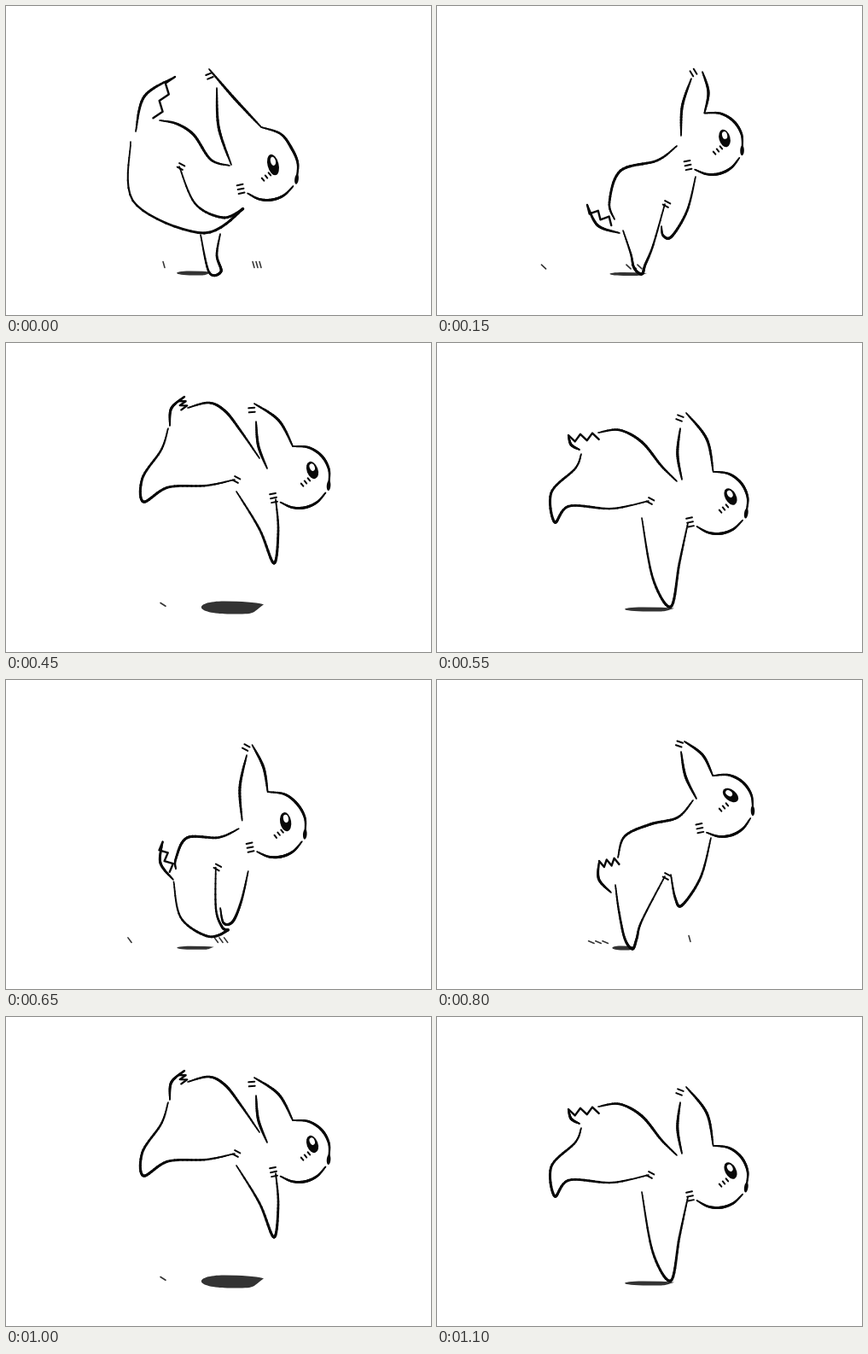
An HTML page with a canvas that plays this animation: 498x362 px, repeating every 1.15 s.

```html
<!DOCTYPE html>
<html lang="en">
<head>
<meta charset="utf-8">
<title>Hopping rabbit</title>
<style>
html, body { margin: 0; height: 100%; overflow: hidden; background: #fff; }
canvas { display: block; }
</style>
</head>
<body>
<canvas id="stage" width="498" height="362"></canvas>
<script>
const ctx = document.getElementById('stage').getContext('2d');
const STEP = 50, STEPS = 23, CYCLE = 12, INK = '#080808', GREY = '#333';

// head: centre, tilt, stretch    eye: centre, tilt    ear: tip, back edge top, back edge foot
// legs run down one side, round the paw and up the other    shadow: left, right, y, height
const poses = [
  { at: 0, // crouch
    head: [306, 191, .33, 13], eye: [313, 186, -.25], ear: [238, 74, 247, 96, 264, 186],
    back: [262, 187, 240, 180, 220, 151, 200, 138, 180, 134], tail: [152, 147, 198, 83],
    hind: [146, 159, 150, 230, 230, 266, 277, 238, 255, 248, 222, 232, 203, 188],
    front: [251, 267, 247, 292, 252, 311, 238, 312, 228, 268], shadow: [198, 241, 313, 5] },
  { at: 3, // push off
    head: [322, 161, .23, 0], eye: [337, 155, -.25], ear: [311, 77, 298, 85, 286, 152],
    back: [281, 164, 258, 181, 215, 193, 202, 230, 208, 250], tail: [214, 266, 176, 233],
    hind: [218, 263, 227, 290, 231, 307, 240, 314, 244, 303, 253, 281, 267, 232],
    front: [303, 200, 293, 240, 275, 270, 265, 269, 263, 258], shadow: [200, 246, 314, 4] },
  { at: 5, // stretch
    head: [334, 147, .17, 0], eye: [344, 135, -.9], ear: [290, 72, 286, 84, 304, 139],
    back: [300, 141, 282, 161, 250, 169, 220, 183, 212, 208], tail: [204, 249, 190, 212],
    hind: [209, 240, 213, 270, 220, 303, 229, 315, 234, 303, 240, 282, 267, 230],
    front: [321, 185, 309, 231, 287, 264, 279, 255, 274, 228], shadow: [204, 232, 314, 5] },
  { at: 7, // leap
    head: [348, 121, .2, 0], eye: [363, 111, -.95], ear: [272, 62, 277, 74, 300, 111],
    back: [309, 116, 285, 104, 260, 89, 235, 79, 215, 84], tail: [186, 122, 205, 66],
    hind: [186, 123, 173, 153, 165, 190, 176, 206, 187, 184, 225, 170, 256, 155],
    front: [331, 158, 341, 192, 333, 221, 312, 189, 267, 160], shadow: [218, 295, 308, 12] },
  { at: 9, // fall
    head: [343, 157, .28, 0], eye: [359, 149, -.35], ear: [291, 71, 293, 92, 306, 147],
    back: [297, 135, 275, 103, 257, 80, 238, 70, 213, 76], tail: [192, 97, 209, 63],
    hind: [190, 100, 182, 125, 160, 158, 161, 186, 190, 169, 235, 167, 268, 160],
    front: [316, 183, 319, 220, 314, 258, 297, 218, 270, 174], shadow: [225, 302, 310, 15] },
  { at: 11, // land
    head: [328, 187, .35, 0], eye: [344, 180, -.5], ear: [292, 82, 285, 100, 287, 160],
    back: [281, 162, 263, 144, 240, 116, 214, 102, 189, 105], tail: [167, 125, 154, 108],
    hind: [169, 130, 162, 147, 134, 175, 138, 210, 155, 191, 205, 194, 248, 185],
    front: [294, 211, 284, 258, 274, 309, 253, 276, 240, 205], shadow: [217, 278, 312, 5] }
];

const grass = [
  { x: 294, speed: 21, from: 0, to: 8, blades: 3 },
  { x: 185, speed: 20, from: 0, to: 4, blades: 1 },
  { x: 296, speed: 28, from: 5, to: 10, blades: 1 }
];

// Hermite blend through the key poses, cyclic in time
function poseAt(d) {
  const n = poses.length, i = poses.findLastIndex(p => p.at <= d);
  const [z, a, b, c] = [-1, 0, 1, 2].map(o => {
    const turn = Math.floor((i + o) / n), p = poses[i + o - turn * n];
    return { ...p, at: p.at + turn * CYCLE };
  });
  const h = b.at - a.at, u = (d - a.at) / h, v = 1 - u, ease = u * u * (3 - 2 * u);
  const pose = {};
  for (const part in a) {
    if (part === 'at') continue;
    pose[part] = a[part].map((x, j) => {
      const y = b[part][j];
      const ma = (y - z[part][j]) / (b.at - z.at), mb = (c[part][j] - x) / (c.at - a.at);
      return x + ease * (y - x) + h * u * v * (v * ma - u * mb);
    });
  }
  return pose;
}

const pairs = flat => flat.flatMap((x, i) => i % 2 ? [] : [[x, flat[i + 1]]]);

// Point at a share s (0..1) of a smooth curve through pts
function along(pts, s) {
  const last = pts.length - 1, k = Math.min(Math.floor(s * last), last - 1), u = s * last - k;
  const a = pts[Math.max(k - 1, 0)], b = pts[k], c = pts[k + 1], d = pts[Math.min(k + 2, last)];
  return [0, 1].map(j => b[j] + u / 2 * (c[j] - a[j] + u * (2 * a[j] - 5 * b[j] + 4 * c[j] - d[j]
    + u * (3 * (b[j] - c[j]) + d[j] - a[j]))));
}

function line(pts, width, color = INK) {
  ctx.strokeStyle = color;
  ctx.lineWidth = width;
  ctx.beginPath();
  pts.forEach(p => ctx.lineTo(...p));
  ctx.stroke();
}

// Ink stroke that thins out at both ends
function brush(pts) {
  const n = pts.length * 8;
  for (let i = 0; i < n; i++) {
    line([along(pts, i / n), along(pts, (i + 1) / n)], 1.6 + 1.5 * Math.sin(Math.PI * (i + .5) / n));
  }
}

// From a to b, bulging sideways by a share of the length
const bow = ([ax, ay], [bx, by], k) =>
  [[ax, ay], [(ax + bx) / 2 + (by - ay) * k, (ay + by) / 2 - (bx - ax) * k], [bx, by]];

// Short strokes side by side, each pointing along the angle
function tuft(x, y, angle, count, gap = 5, size = 7, width = 2, color = INK) {
  const c = Math.cos(angle), s = Math.sin(angle);
  for (let i = 0; i < count; i++) {
    const k = (i - (count - 1) / 2) * gap, px = x - s * k, py = y + c * k;
    line([[px - c * size / 2, py - s * size / 2], [px + c * size / 2, py + s * size / 2]], width, color);
  }
}

function oval(x, y, rx, ry, tilt, fill) {
  ctx.beginPath();
  ctx.ellipse(x, y, rx, ry, tilt, 0, 7);
  ctx.fillStyle = fill;
  ctx.fill();
}

function drawHead([x, y, tilt, stretch], [ex, ey, look], [tip, top, foot]) {
  const CROWN = -2.04, JAW = 1.92;
  const rim = angle => {
    const r = 36.5 + stretch * Math.max(0, Math.cos(angle - CROWN)) ** 4;
    return [x + r * Math.cos(angle + tilt), y + r * Math.sin(angle + tilt)];
  };
  const arc = (from, to) => [0, .25, .5, .75, 1].map(u => rim(from + (to - from) * u));
  brush(arc(CROWN, 0));
  brush(arc(.25, JAW));
  oval(...rim(0), 2.3, 6, tilt - .2, INK);

  brush(bow(tip, rim(CROWN), .12 - stretch * .01));
  brush(bow(top, foot, -.07));
  const lean = Math.atan2(top[0] - tip[0], tip[1] - top[1]);
  tuft((tip[0] + top[0]) / 2 - 4, (tip[1] + top[1]) / 2 - 3, lean, 2);

  const [jx, jy] = rim(JAW), ry = 10.5 + stretch * .15;
  tuft(jx - 8, jy - 5, -.2, 3);
  tuft(ex - 8, ey + 14, .9, 3, 5, 4);
  oval(ex, ey, 6.5, ry, look, INK);
  oval(ex + ry * .35 * Math.sin(look) + 1, ey - ry * .35 * Math.cos(look), 3, ry * .42, look, '#fff');
}

function drawTail([root, tip], end) {
  brush(bow(root, tip, .2));
  const dx = end[0] - tip[0], dy = end[1] - tip[1], len = Math.hypot(dx, dy);
  const zigzag = [0, 1, 2, 3, 4, 5].map(i => {
    const u = i / 5, dip = i % 2 ? 8 / len : 0;
    return [tip[0] + dx * u - dy * dip, tip[1] + dy * u + dx * dip];
  });
  line(zigzag, 2.4);
}

function drawShadow([left, right, y, h]) {
  const w = right - left, t = y - h / 2, b = y + h / 2;
  ctx.fillStyle = GREY;
  ctx.beginPath();
  ctx.moveTo(right, t + h * .25);
  ctx.bezierCurveTo(right - w * .2, b, right - w * .1, b, left + w * .5, b);
  ctx.bezierCurveTo(left - w * .08, b, left - w * .08, t, left + w * .4, t);
  ctx.quadraticCurveTo(right - w * .2, t, right, t + h * .25);
  ctx.fill();
}

function drawGrass(d) {
  for (const g of grass) {
    if (d < g.from || d > g.to) continue;
    const age = d - g.from, flat = Math.min(age / 6, 1);
    for (let i = 0; i < g.blades; i++) {
      const shift = (i - (g.blades - 1) / 2) * (4 + 5 * flat);
      tuft(g.x - g.speed * age + shift, 303 + 5 * flat, 1.3 - 1.1 * flat, 1, 0, 7, 1.6, GREY);
    }
  }
}

function draw(d) {
  ctx.clearRect(0, 0, 498, 362);
  ctx.lineCap = ctx.lineJoin = 'round';
  const { head, eye, shadow, ...limbs } = poseAt(d);
  const [ear, back, tail, hind, front] = ['ear', 'back', 'tail', 'hind', 'front'].map(k => pairs(limbs[k]));
  drawGrass(d);
  drawShadow(shadow);
  [back, hind, front].forEach(brush);
  drawTail(tail, back.at(-1));
  const [bx, by] = hind.at(-1);
  tuft(bx + 2, by, .5, 2);
  drawHead(head, eye, ear);
}

const start = performance.now();
let shown = -1;

function tick() {
  const step = Math.floor((performance.now() - start) / STEP) % STEPS;
  // The second hop leaves out the opening crouch
  if (step !== shown) draw(step < CYCLE ? step : step - CYCLE + 1);
  shown = step;
  requestAnimationFrame(tick);
}
tick();
</script>
</body>
</html>
```
